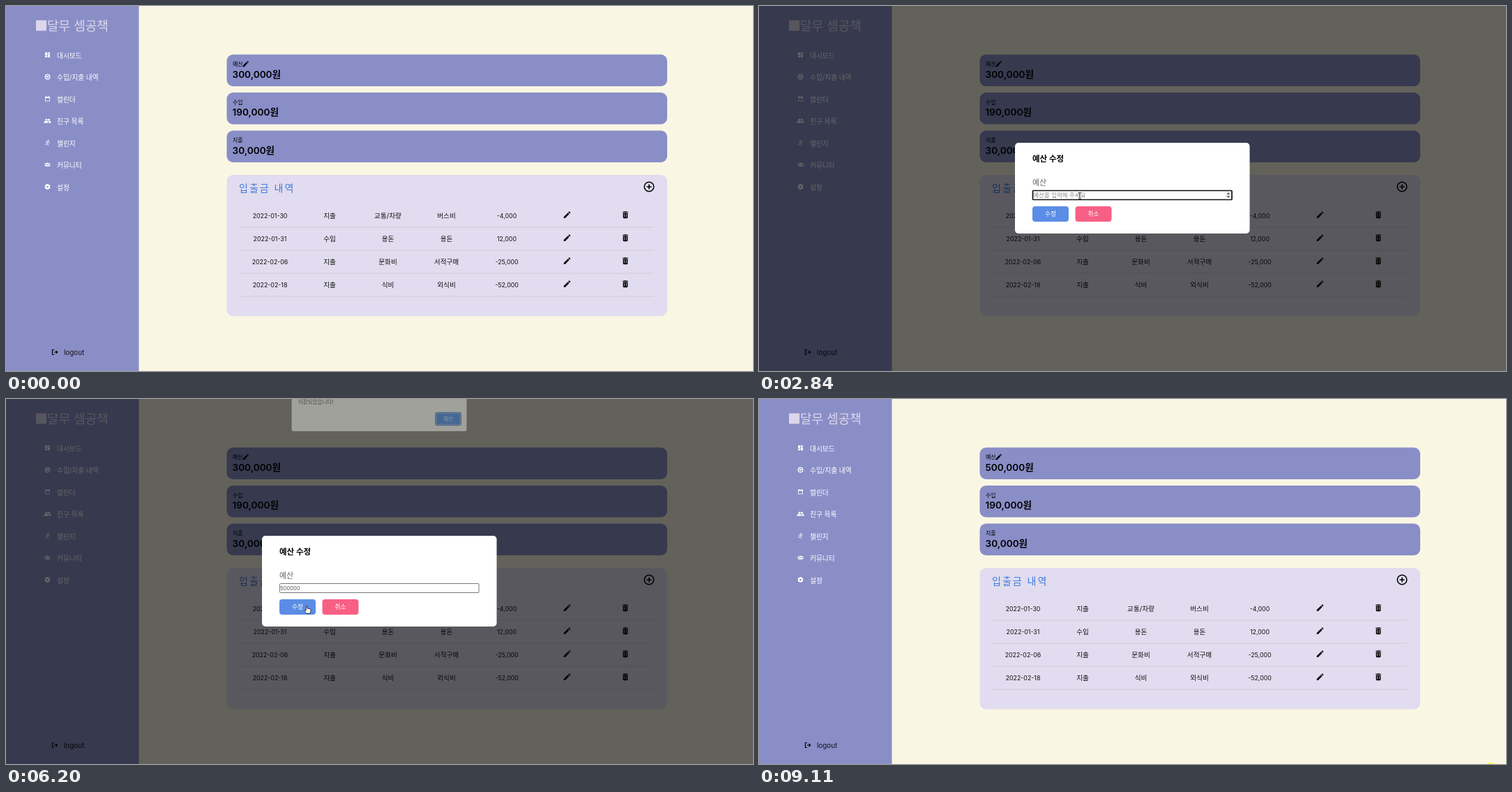
These frames come from a looping animation (1071x523 px, 9.18 s). An HTML page:

```html
<!DOCTYPE html>
<html lang="ko">
<head>
<meta charset="utf-8">
<title>가계부</title>
<style>
html, body { margin: 0; width: 100%; height: 100%; overflow: hidden; background: #f9f7e3; }
svg { display: block; width: 1071px; height: 523px; font-family: Inter, "Noto Sans CJK KR", sans-serif; }
text { white-space: pre; }
</style>
</head>
<body>
<svg id="stage" viewBox="0 0 1071 523" xmlns="http://www.w3.org/2000/svg"></svg>
<script>
const LOOP = 9180;
const OPEN = 1360, FOCUS = 2340, BLUR = 5850, ALERT = 6140, SAVED = 7330, GONE = 7520;
const KEYS = [3310, 3510, 3980, 4110, 4310, 4440];
const CARET_OFF = [[2840, 3310], [5040, 5540]];
const CLICKS = [[1310, 1410], [FOCUS, 2440], [BLUR, 5920], [7270, SAVED], [9110, LOOP]];

// start, end, steps, way points at equal shares of the move
const MOVES = [
  [460, 1130, 11, [[965, 440], [760, 300], [560, 180], [420, 105], [355, 86], [341, 83]]],
  [1610, 2440, 12, [[341, 83], [400, 165], [448, 255], [464, 291], [460, 272]]],
  [5450, 5920, 7, [[460, 272], [431, 296]]],
  [6600, 7130, 9, [[431, 296], [445, 275], [500, 190], [580, 90], [622, 40], [633, 31]]],
  [8110, 8510, 7, [[633, 31], [645, 48], [690, 110], [770, 215], [870, 350], [940, 445], [987, 506], [1049, 528]]]
];

const ICONS = {
  pencil: '<path d="M3 17.2V21h3.8L17.8 9.9l-3.7-3.7zM20.7 7a1 1 0 0 0 0-1.4l-2.3-2.3a1 1 0 0 0-1.4 0l-1.9 1.8 3.8 3.8z"/>',
  trash: '<path fill-rule="evenodd" d="M6 19a2 2 0 0 0 2 2h8a2 2 0 0 0 2-2V7H6zM19 4h-3.5l-1-1h-5l-1 1H5v2h14zM9 10h1.4v8H9zM13.6 10H15v8h-1.4z"/>',
  board: '<path d="M3 13h8V3H3zm0 8h8v-6H3zm10 0h8V11h-8zm0-18v6h8V3z"/>',
  gauge: '<circle cx="12" cy="12" r="8.5" fill="none" stroke="#fff" stroke-width="3"/><path d="M6 9h12v3H6zM10 11h4v5h-4z"/>',
  calendar: '<path fill-rule="evenodd" d="M3 4h3V2h2v2h8V2h2v2h3v17H3zM5 9v10h14V9z"/>',
  friends: '<circle cx="8" cy="8" r="4"/><circle cx="17" cy="8" r="4"/><path d="M-1 20v-3c0-6 16-6 16 0v3zM17 20v-4l-1-3c5-1 9 1 9 4v3z"/>',
  run: '<circle cx="15" cy="4" r="2.2"/><path d="M5 10l4-3 5 1 2 4h4M12 8l-2 6 4 3v5M10 14l-2 4H3" fill="none" stroke="#fff" stroke-width="2.2"/>',
  crowd: '<circle cx="12" cy="8" r="3.5"/><circle cx="5" cy="9" r="3"/><circle cx="19" cy="9" r="3"/><path d="M2 13h20v3l-4 2H6l-4-2z"/>',
  gear: '<path fill-rule="evenodd" d="M9 2h6l1 3 3-1 3 5-2 3 2 3-3 5-3-1-1 3H9l-1-3-3 1-3-5 2-3-2-3 3-5 3 1zM12 8.5a3.5 3.5 0 1 0 .1 0z"/>'
};

const icon = (name, x, y, size, fill = '#000') =>
  `<g fill="${fill}" transform="translate(${x} ${y}) scale(${size}) translate(-12 -12)">${ICONS[name]}</g>`;
const rect = (x, y, w, h, fill, r = 0, more = '') =>
  `<rect x="${x}" y="${y}" width="${w}" height="${h}" rx="${r}" fill="${fill}" ${more}/>`;
const text = (x, y, size, str, fill = '#000', weight = 400, more = '') =>
  `<text x="${x}" y="${y}" font-size="${size}" fill="${fill}" font-weight="${weight}" ${more}>${str}</text>`;
const mid = 'text-anchor="middle"';

function sidebar() {
  const items = [['board', '대시보드'], ['gauge', '수입/지출 내역'], ['calendar', '캘린더'], ['friends', '친구 목록'],
    ['run', '챌린지'], ['crowd', '커뮤니티'], ['gear', '설정']];
  return rect(0, 0, 190.5, 523, '#8a8ec7') +
    rect(43, 20.5, 15, 15, '#dcd7ea') +
    text(59, 35, 18, '달무 셈공책', '#dcd7ea', 300) +
    items.map(([name, label], i) => {
      const y = 70 + i * 31.5;
      return icon(name, 59.5, y, .39, '#fff') + text(73, y + 4.6, 9.7, label, '#fff');
    }).join('') +
    '<path d="M69 492.5h-2.5v7H69M69 496h4.5M71.5 493.8l2.2 2.2-2.2 2.2" fill="none" stroke="#000" stroke-width="1.2"/>' +
    text(83, 500, 9.8, 'logout', '#111');
}

function cards() {
  return [['예산', '300,000원'], ['수입', '190,000원'], ['지출', '30,000원']].map(([label, sum], i) => {
    const y = 69.5 + i * 54.5;
    return rect(316.5, y, 631.5, 45.5, '#8a8ec7', 9) + text(325, y + 16.7, 8, label, '#000', 500) +
      text(324.5, y + 33.3, 13.6, sum, '#000', 600, i ? '' : 'id="budget"');
  }).join('') + icon('pencil', 343.7, 83, .46);
}

function ledger() {
  const rows = [
    ['2022-01-30', '지출', '교통/차량', '버스비', '-4,000'],
    ['2022-01-31', '수입', '용돈', '용돈', '12,000'],
    ['2022-02-06', '지출', '문화비', '서적구매', '-25,000'],
    ['2022-02-18', '지출', '식비', '외식비', '-52,000']
  ];
  const cols = [378.5, 464, 547.5, 631.5, 718];
  return rect(316.5, 242, 631.5, 202.5, '#e1dcef', 9) +
    text(334, 266, 14, '입출금 내역', '#3c7ad9', 300, 'letter-spacing="2"') +
    '<path d="M918.5 259h7M922 255.500v7" stroke="#000" stroke-width="1.6"/>' +
    '<circle cx="922" cy="259" r="6.8" fill="none" stroke="#000" stroke-width="1.5"/>' +
    rows.map((row, i) => {
      const y = 300 + i * 33;
      return row.map((s, c) => text(cols[c], y + 3.5, c % 4 ? 9.6 : 8.8, s, '#111', 400, mid)).join('') +
        icon('pencil', 804.5, y - .8, .53) + icon('trash', 888, y - .8, .56) +
        rect(334, y + 16.5, 595, 1, '#d0cbd8');
    }).join('');
}

function modal() {
  return `<g id="modal">${rect(0, 0, 1071, 523, '#000', 0, 'opacity=".6"')}
    ${rect(367, 196, 336.5, 130, '#fff', 5)}
    ${text(392, 223.3, 11.5, '예산 수정', '#000', 700)}
    ${text(392, 257, 11, '예산', '#666')}
    ${rect(392.5, 264.5, 285.5, 13, '#fff', 1, 'id="field" stroke="#767676"')}
    ${text(393.3, 274.2, 8.5, '', '#888', 400, 'id="entry"')}
    <g id="spinner">${rect(669, 266, 8, 10.5, '#eee')}<path d="M670.8 269.700l2.200-2.500 2.200 2.500zM670.8 272.300l2.200 2.500 2.200-2.500z" fill="#444"/></g>
    ${rect(393, 265.500, 1, 11, '#000', 0, 'id="caret"')}
    ${rect(392, 287, 52, 22, '#5b8de6', 4)}${text(418, 301.300, 8.7, '수정', '#fff', 500, mid)}
    ${rect(453.5, 287, 52, 22, '#f85f84', 4)}${text(479.500, 301.300, 8.7, '취소', '#fff', 500, mid)}</g>`;
}

function alertBox() {
  return `<g id="alert">
    ${rect(408.500, -10, 253, 61.500, '#000', 3, 'opacity=".22"')}
    ${rect(409.500, -10, 251, 60.300, '#fff', 2)}
    ${text(418.500, 11.400, 7.6, '저장되었습니다!', '#333')}
    ${rect(615.700, 23.500, 36.600, 18, '#fff', 2.500, 'id="ring" stroke="#2b6fd0" stroke-width="1.300"')}
    ${rect(616.700, 24.500, 34.600, 16, '#1a73e8', 2)}
    ${text(634, 35, 7, '확인', '#fff', 400, mid)}</g>`;
}

function pointers() {
  return `<circle id="halo" r="7.3" fill="#ff0" opacity=".65"/>
    <g id="arrow"><path d="M0 0v9.400l2.200-2 1.500 3.300 1.500-.7-1.500-3.200h3z" fill="#fff" stroke="#000" stroke-width=".6"/></g>
    <g id="hand"><path d="M-.8.8Q0-.4.9.8V4l4 .9q1.300.4 1.100 2L5 11.500H0L-3 7.500q0-1.400 1.200-1l1 .9z" fill="#fff" stroke="#000" stroke-width=".7"/></g>
    <g id="beam"><path d="M-2-4.500h1.500l.5.500.5-.5H2M0-4v8M-2 4.500h1.500l.5-.5.5.5H2" fill="none" stroke="#222" stroke-width=".9"/></g>`;
}

const stage = document.getElementById('stage');
stage.innerHTML = rect(0, 0, 1071, 523, '#f9f7e3') + sidebar() + cards() + ledger() + modal() + alertBox() + pointers();
const el = {};
stage.querySelectorAll('[id]').forEach(n => el[n.id] = n);

const within = (t, spans) => spans.some(([a, b]) => t >= a && t < b);
const show = (n, on) => n.style.display = on ? '' : 'none';
const inBox = ([x, y], l, t, r, b) => x >= l && x <= r && y >= t && y <= b;

function position(t) {
  const move = MOVES.filter(m => t >= m[0]).pop();
  if (!move) return [1049, 528];
  const [start, end, steps, pts] = move;
  const k = Math.min(steps - 1, Math.floor((t - start) / (end - start) * (steps - 1) + .001));
  const u = (start === 460 ? k / (steps - 1) : (k + 1) / steps) * (pts.length - 1);
  const i = Math.min(pts.length - 2, Math.floor(u)), f = u - i;
  return pts[i].map((v, c) => v + (pts[i + 1][c] - v) * f);
}

function pointerAt(p, t) {
  if (t < OPEN) return inBox(p, 338, 78, 349, 88) ? 'hand' : 'arrow';
  if (t >= SAVED) return 'arrow';
  if (inBox(p, 392, 264, 679, 279)) return 'beam';
  return inBox(p, 392, 287, 444, 309) || inBox(p, 453, 287, 506, 309) ? 'hand' : 'arrow';
}

function alertLook(t) {
  if (t < ALERT || t >= GONE) return [0, 0];
  if (t < 6270) return t < 6205 ? [.4, -4] : [.8, -1.500];
  if (t < SAVED) return [1, 0];
  return t < 7400 ? [1, -1.300] : t < 7460 ? [.6, -2.500] : [.25, -3.500];
}

function draw(t) {
  const p = position(t), kind = pointerAt(p, t);
  const focused = t >= FOCUS && t < BLUR;
  const typed = KEYS.filter(k => t >= k).length;
  show(el.modal, t >= OPEN && t < SAVED);
  el.budget.textContent = t < SAVED ? '300,000원' : '500,000원';

  el.field.setAttribute('stroke', focused ? '#101010' : '#767676');
  el.field.setAttribute('stroke-width', focused ? 1.700 : 1);
  el.entry.textContent = typed ? '500000'.slice(0, typed) : '예산을 입력해 주세요';
  el.entry.setAttribute('font-size', typed ? 7.5 : 8.5);
  el.entry.setAttribute('fill', typed ? '#555' : '#888');
  show(el.spinner, focused || kind === 'beam');
  show(el.caret, focused && !within(t, CARET_OFF));
  el.caret.setAttribute('x', 393 + typed * 4.600);

  const [alpha, dy] = alertLook(t);
  show(el.alert, alpha > 0);
  el.alert.setAttribute('opacity', alpha);
  el.alert.setAttribute('transform', `translate(0 ${dy})`);
  show(el.ring, t < SAVED);

  const at = `translate(${p[0].toFixed(2)} ${p[1].toFixed(2)})`;
  for (const name of ['arrow', 'hand', 'beam']) {
    show(el[name], t >= 460 && name === kind);
    el[name].setAttribute('transform', at);
  }
  show(el.halo, within(t, CLICKS));
  el.halo.setAttribute('transform', at);
}

const begin = performance.now();
function tick() {
  draw((performance.now() - begin) % LOOP);
  requestAnimationFrame(tick);
}
tick();
</script>
</body>
</html>
```
